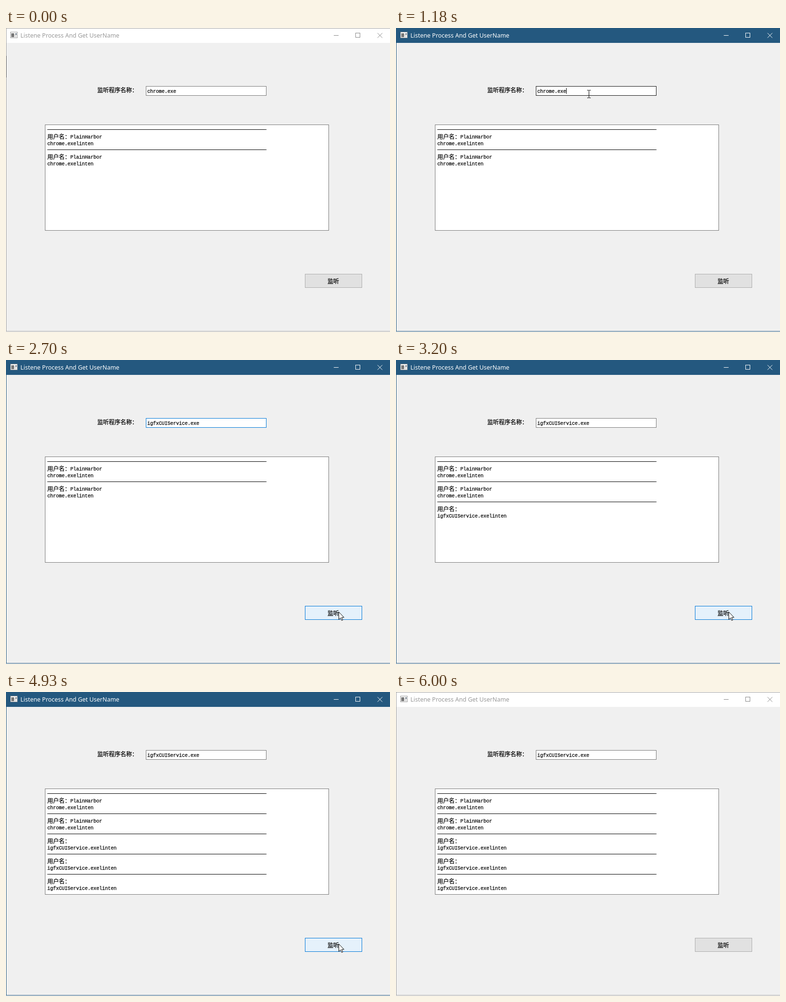
These frames come from a looping animation (799x633 px, 6140 ms). An HTML page:

```html
<!DOCTYPE html>
<html lang="zh-CN">
<head>
<meta charset="utf-8">
<title>Listene Process And Get UserName</title>
<style>
html, body { margin: 0; width: 100%; height: 100%; overflow: hidden; background: #fff; }
svg { display: block; }
.mono { font: 10px "Liberation Mono", monospace; }
.cjk { font: 12px "Noto Sans CJK SC", "Noto Sans CJK", sans-serif; }
.mono, .cjk { stroke: #000; stroke-width: .25px; }
.crisp { shape-rendering: crispEdges; }
#marked { fill: #fff; stroke: none; }
#heading { font: 12.45px "Noto Sans", "Open Sans", sans-serif; }
</style>
</head>
<body>
<svg width="799" height="633">
  <rect width="799" height="632" fill="#f0f0f0"/>
  <rect id="bar" width="799" height="31"/>
  <path id="frame" class="crisp" fill="none" d="M799 .5H.5V631.5H799"/>
  <path id="notch" class="crisp" stroke="#555" d="M.5 58V103"/>

  <g class="crisp">
    <rect x="9.5" y="8.5" width="14" height="12" fill="#fff" stroke="#999"/>
    <rect x="11" y="11" width="6" height="8" fill="#777"/>
    <rect x="18" y="11" width="4" height="8" fill="#ddd"/>
    <rect x="20" y="11" width="2" height="3" fill="#567"/>
  </g>
  <text id="heading" x="30" y="20">Listene Process And Get UserName</text>
  <g id="controls" fill="none">
    <path class="crisp" d="M682 15.5h10M727.5 10.5h9v9h-9z"/>
    <path d="M773 10.5l10 10M783 10.5l-10 10"/>
  </g>

  <text class="cjk" x="190" y="133.5">监听程序名称：</text>
  <rect id="field" class="crisp" x="291.5" y="121.5" width="250" height="19" fill="#fff"/>
  <rect id="mark" y="125" height="13" fill="#0078d7"/>
  <text class="mono" x="294" y="135"><tspan id="plain"></tspan><tspan id="marked"></tspan></text>
  <rect id="caret" y="125" width="1" height="12"/>

  <rect class="crisp" x="81.5" y="201.5" width="590" height="220" fill="#fff" stroke="#7a7a7a"/>
  <g id="log"></g>

  <rect id="button" class="crisp" x="622.5" y="512.5" width="118" height="28"/>
  <text class="cjk" x="669" y="531.5">监听</text>

  <g id="pointer">
    <path id="arrow" fill="#fff" stroke="#000" d="M.5.7V16.3L4 12.9l2.6 5.5 2.2-1L6.4 12H11.3z"/>
    <path id="beam" class="crisp" fill="none" stroke="#000" d="M-3 -7.5H0M1 -7.5H4M.5 -7V8M-3 8.5H0M1 8.5H4"/>
  </g>
</svg>
<script>
const LOOP = 6140, STEP = 70;
const OLD = "chrome.exe", NEW = "igfxCUIService.exe";
const ENTER = 130, ACTIVATE = 1180, FOCUS = 1240, DROP = 1510, PASTE = 1650, EXIT = 5800, LEAVE = 6000;
const CLICKS = [2830, 4170, 4580];

const linear = u => u, easeIn = u => u * u, easeOut = u => 1 - (1 - u) ** 3;
const moves = [
  { start: ENTER, end: 690, to: [417, 161], ease: linear },
  { start: 690, end: 760, to: [401, 137], ease: linear },
  { start: ACTIVATE, end: 1380, to: [281, 134], ease: linear },
  { start: DROP, end: 2000, to: [314, 178], ease: easeIn },
  { start: 2000, end: 2700, to: [692, 524], ease: easeOut },
  { start: 5390, end: 5730, to: [759, 634], ease: easeIn }
];
moves.forEach((m, i) => m.from = i ? moves[i - 1].to : [686, 571]);

const $ = id => document.getElementById(id);
const set = (id, attrs) => { for (const k in attrs) $(id).setAttribute(k, attrs[k]); };
const show = (el, on) => el.setAttribute("visibility", on ? "visible" : "hidden");
const mix = (a, b, u) => a.map((v, i) => Math.round(v + (b[i] - v) * u));
const clamp = (v, lo, hi) => Math.max(lo, Math.min(hi, v));
const inside = ([x, y], l, t, r, b) => x >= l && x < r && y >= t && y < b;

function pointerAt(t) {
  const m = moves.findLast(m => m.start <= t) || moves[0];
  const passed = STEP * Math.floor((t - m.start) / STEP);
  return mix(m.from, m.to, m.ease(clamp(passed / (m.end - m.start), 0, 1)));
}

// Fades in on a click, holds, fades out
function pressAt(t) {
  return Math.max(...CLICKS.map(c => {
    const d = Math.floor((t - c) / STEP);
    return clamp(Math.min(d + 1, 5 - d) / 2, 0, 1);
  }));
}

const logTimes = [0, 0, ...CLICKS.map(c => c + 2 * STEP)];
$("log").innerHTML = logTimes.map((_, i) => {
  const y = 211 + 42 * i, known = i < 2;
  return `<g><rect class="crisp" x="86" y="${y}" width="456" height="1"/>
    <text class="cjk" x="86" y="${y + 19.5}">用户名：</text>
    <text class="mono" x="134" y="${y + 19}">${known ? "PlainHarbor" : ""}</text>
    <text class="mono" x="86" y="${y + 33}">${known ? OLD : NEW}linten</text></g>`;
}).join("");

function draw(t) {
  const active = t >= ACTIVATE && t < LEAVE;
  set("bar", { fill: active ? "#24587f" : "#fff" });
  set("frame", { stroke: active ? "#24587f" : "#a0a0a0" });
  set("heading", { fill: active ? "#fff" : "#999" });
  set("controls", { stroke: active ? "#fff" : "#888" });
  show($("notch"), t < ACTIVATE);

  const spot = pointerAt(t);
  const overField = inside(spot, 291, 121, 542, 141);
  const focused = t >= FOCUS && t < CLICKS[0];
  set("field", { stroke: focused ? "#0078d7" : overField ? "#171717" : "#7a7a7a" });

  // Dragging left selects from the end of the text
  const pasted = t >= PASTE, text = pasted ? NEW : OLD, size = text.length;
  const dragging = t >= ACTIVATE && !pasted;
  const n = dragging ? clamp(Math.round((spot[0] - 294) / 6), 0, size) : size;
  $("plain").textContent = text.slice(0, n);
  $("marked").textContent = text.slice(n);
  set("mark", { x: 294 + 6 * n, width: 6 * (size - n) });
  set("caret", { x: 294 + 6 * n });
  show($("caret"), t >= ACTIVATE && t < PASTE + 530);

  [...$("log").children].forEach((row, i) => show(row, t >= logTimes[i]));

  const hover = inside(spot, 622, 512, 741, 541), p = pressAt(t);
  set("button", {
    fill: hover ? `rgb(${mix([229, 241, 251], [204, 228, 247], p)})` : "#e1e1e1",
    stroke: hover ? `rgb(${mix([0, 120, 215], [0, 84, 153], p)})` : "#adadad"
  });

  const visible = t >= ENTER && t < EXIT;
  const beam = overField || (t >= ACTIVATE && t < DROP + STEP);
  set("pointer", { transform: `translate(${spot})` });
  show($("arrow"), visible && !beam);
  show($("beam"), visible && beam);
}

const begin = performance.now();
(function tick() {
  draw((performance.now() - begin) % LOOP);
  requestAnimationFrame(tick);
})();
</script>
</body>
</html>
```
